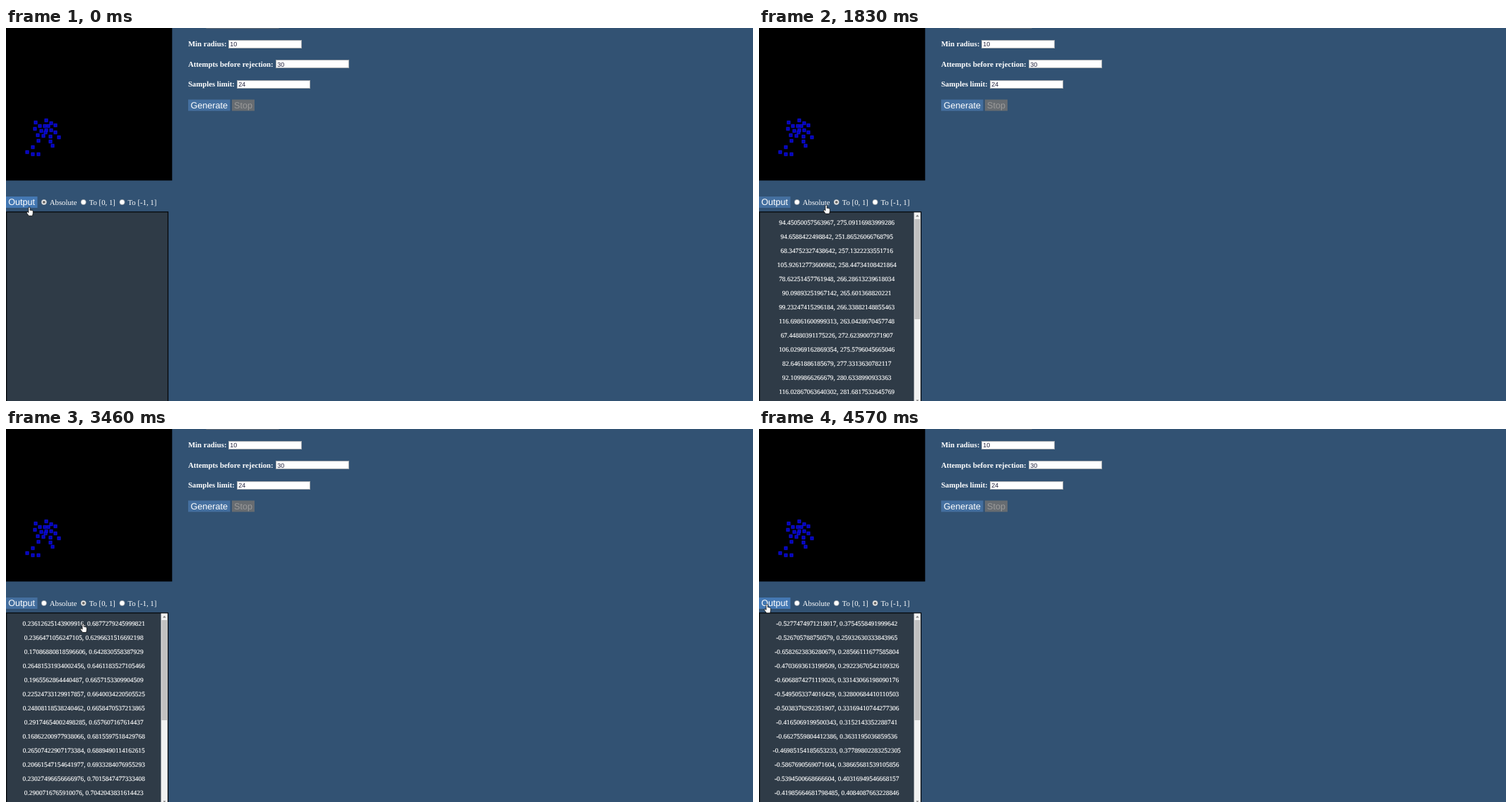
Animation of 1058x529 px, one loop 5430 ms. Source, as an HTML page:

```html
<!DOCTYPE html>
<html lang="en">
<head>
<meta charset="utf-8">
<title>Sample generator</title>
<style>
  html, body { margin: 0; width: 100%; height: 100%; overflow: hidden; background: #325273; }
  svg { display: block; width: 100vw; height: 100vh; }
  text { fill: #fff; white-space: pre; text-rendering: geometricPrecision; }
  .label, .option, .row { font-family: "Liberation Serif", "Times New Roman", serif; font-size: 10.75px; }
  .label { font-weight: bold; }
  .row { font-size: 9.4px; text-anchor: middle; stroke: #fff; stroke-width: .15; }
  .field, .button { font-family: "Liberation Sans", Arial, sans-serif; }
  .field { font-size: 8.96px; fill: #22223c; }
  .button { font-size: 12.6px; }
  .off { fill: #9a9a9a; }
</style>
</head>
<body>
<svg id="stage" viewBox="0 0 1058 529">
  <rect width="1058" height="529" fill="#325273"/>
  <rect width="235.3" height="216.3"/>
  <g id="dots" fill="#0000b4" stroke="#1010e6"></g>
  <rect x="283.5" width="103" height="1" fill="#626c76"/>
  <g id="form"></g>

  <rect x="258" y="101.5" width="59.5" height="16" fill="#446f9f"/>
  <text class="button" x="261.5" y="113.7">Generate</text>
  <rect x="320" y="101.5" width="32" height="16" fill="#676c71"/>
  <text class="button off" x="323" y="113.7">Stop</text>

  <rect id="output" y="239" width="44.5" height="16"/>
  <text class="button" x="3.3" y="251.3">Output</text>
  <g id="options"></g>

  <rect x=".65" y="260.9" width="228.8" height="300" fill="#2f3b47" stroke="#05080b" stroke-width="1.3"/>
  <g id="list">
    <rect x="219.5" y="261.5" width="9.3" height="268" fill="#f1f1f1"/>
    <rect x="220.5" y="271" width="7.8" height="142" fill="#c1c1c1"/>
    <path d="M222 267.5l2.3-2.6 2.3 2.6z M222.4 527.6h4l-2 2z" fill="#777"/>
  </g>

  <circle id="halo" r="7.2" fill="#d2d22a" fill-opacity=".82"/>
  <path id="hand" fill="#fff" stroke="#000" stroke-width=".75" stroke-linejoin="round"
    d="M-1.2 8V1.1a1.2 1.1 0 0 1 2.4 0V4.6a.8 .8 0 0 1 1.5 .2a.8 .8 0 0 1 1.4 .3a.7 .8 0 0 1 1.2 .7V8.8L4.5 12.4H-.6L-3.6 8.6Q-4.2 6.3-2.6 6.7Z"/>
</svg>
<script>
const LOOP = 5430, TICK = 1000 / 15, HOLD = 135, SIZE = 400;
const $ = id => document.getElementById(id);

function add(parent, tag, attrs, text = "") {
  const el = document.createElementNS("http://www.w3.org/2000/svg", tag);
  for (const key in attrs) el.setAttribute(key, attrs[key]);
  el.textContent = text;
  return parent.appendChild(el);
}

// the printed list; the other two modes are computed from it
const samples = `94.45050057563967, 275.09116983999286
94.6588422498842, 251.86526066768795
68.34752327438642, 257.1322233551716
105.92612773600982, 258.44734108421864
78.62251457761948, 266.28613239618034
90.09893251967142, 265.601368820221
99.23247415296184, 266.33882148855463
116.69861600999313, 263.0428670457748
67.44880391175226, 272.6239007371907
106.02969162869354, 275.5796045665046
82.6461886185679, 277.3313630782117
92.1099866266679, 280.6338990933363
116.02867063640302, 281.6817532645769`.split("\n").map(line => line.split(", ").map(Number));
const modes = [v => v, v => v / SIZE, v => v / SIZE * 2 - 1];

const curve = (n, point) => Array.from({ length: n }, (_, i) => point(i));
const dots = [
  ...samples.map(([x, y]) => [x * .5875 + 1.7, y * .5875 - 17]),
  ...curve(4, i => [45 + 6.5 * i + 1.2 * i * i, 152.3 + i]),
  ...curve(3, i => [46 + 23 * i - 6.4 * i * i, 160.2 - 1.6 * i + 2.4 * i * i]),
  ...curve(4, i => [37.5 - 8 * Math.cos((i - 1) * Math.PI / 2), 180 - 10.8 * .36 ** i])
];
for (const [x, y] of dots)
  add($("dots"), "rect", { x: Math.round(x) - 2, y: Math.round(y) - 2, width: 4, height: 4 });

[["Min radius:", 10, 315], ["Attempts before rejection:", 30, 382], ["Samples limit:", 24, 327]]
  .forEach(([label, value, x], i) => {
    const y = 26.2 + i * 28.45;
    add($("form"), "text", { class: "label", x: 257.9, y }, label);
    add($("form"), "rect", { x: x + .5, y: Math.floor(y - 9) + .5, width: 103, height: 11,
      fill: "#fff", stroke: "#a0a6ac" });
    add($("form"), "text", { class: "field", x: x + 2.2, y: y - .1 }, value);
  });

const marks = [["Absolute", 53.8], ["To [0, 1]", 109.7], ["To [-1, 1]", 164.5]].map(([label, cx]) => {
  add($("options"), "circle", { cx, cy: 247, r: 3.7, fill: "#fff", stroke: "#6f7780", "stroke-width": .6 });
  add($("options"), "text", { class: "option", x: cx + 8, y: 250.9 }, label);
  return add($("options"), "circle", { cx, cy: 247, r: 2.1, fill: "#6c6c6c" });
});
const rows = samples.map((_, i) => add($("list"), "text", { class: "row", x: 110.2, y: 278.5 + i * 20 }));

// curved pointer strokes between the things it clicks
const rest = [33, 254];
const strokes = [
  { start: 70, end: 200, bend: [30, 252], to: [28, 251], power: 1 },
  { start: 990, end: 1480, bend: [70, 263], to: [110, 248], power: 2 },
  { start: 1780, end: 2180, bend: [74, 257], to: [38, 252], power: 1.5 },
  { start: 3040, end: 3530, bend: [32, 311], to: [183, 252], power: .6 },
  { start: 3950, end: 4290, bend: [-4, 268], to: [11.3, 248.5], power: 2 }
];
// button releases: Output and the next option take turns
const releases = [530, 1680, 2380, 3880, 4570];

function pointer(t) {
  let from = rest;
  for (const { start, end, bend, to, power } of strokes) {
    if (t < start) break;
    const steps = Math.round((end - start) / TICK) + 1;
    const step = Math.min(steps, Math.floor((t - start) / (end - start) * (steps - 1) + .05) + 1);
    const s = 1 - (1 - step / steps) ** power, r = 1 - s;
    from = from.map((v, i) => r * r * v + 2 * r * s * bend[i] + s * s * to[i]);
  }
  return from;
}

let shown = -1;
function showList(count) {
  if (count === shown) return;
  shown = count;
  $("list").style.display = count ? "" : "none";
  if (count) rows.forEach((row, i) => row.textContent = samples[i].map(modes[count - 1]).join(", "));
}

function draw(t) {
  const [x, y] = pointer(t);
  const over = x < 44.5 && y < 255.5;
  const pressed = releases.some(r => t >= r - HOLD && t < r);
  const done = releases.filter(r => t >= r).length;

  $("hand").setAttribute("transform", `translate(${x} ${y})`);
  $("halo").setAttribute("transform", `translate(${x - .7} ${y + 1.6})`);
  $("halo").style.display = pressed ? "" : "none";
  $("output").setAttribute("fill", over ? "#4478b3" : "#446f9f");
  marks.forEach((mark, i) => mark.style.display = i === Math.floor(done / 2) ? "" : "none");
  showList(Math.ceil(done / 2));
}

const begin = performance.now();
function tick() {
  draw((performance.now() - begin) % LOOP);
  requestAnimationFrame(tick);
}
tick();
</script>
</body>
</html>
```
